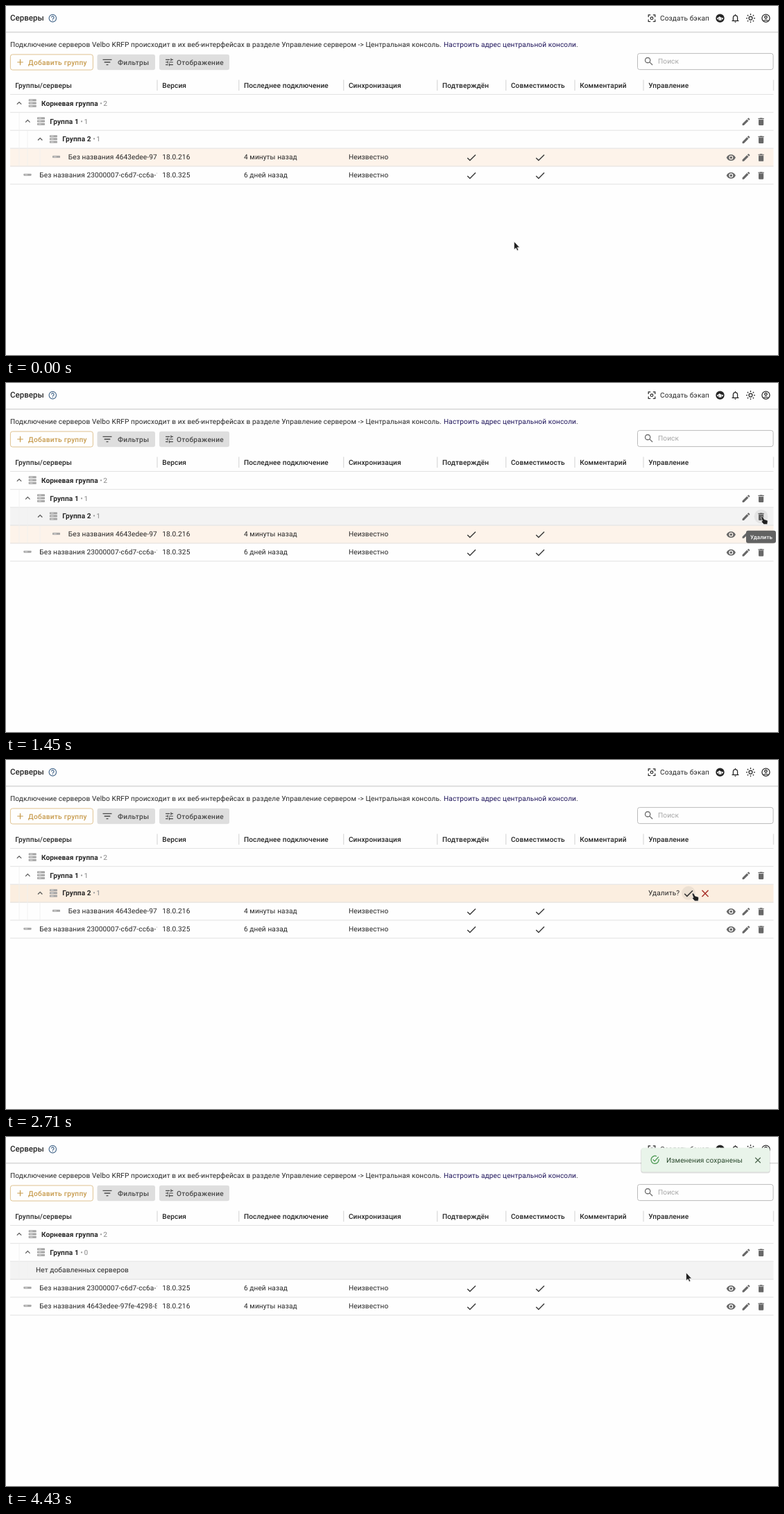
An HTML page for the animation above (4.69 s loop, 1113 by 503 pixels).

```html
<!DOCTYPE html>
<html lang="ru">
<head>
<meta charset="utf-8">
<style>
html, body { margin: 0; width: 100%; height: 100%; overflow: hidden; background: #fefefe; }
svg { display: block; width: 1113px; height: 503px; }
text { font: 400 10.11px Roboto, sans-serif; letter-spacing: .0107em; text-rendering: geometricPrecision; white-space: pre; }
.head { font-weight: 500; }
.group { font-weight: 700; }
.count { font-weight: 500; fill: #9e9e9e; }
.title { font-size: 11.55px; font-weight: 500; letter-spacing: 0; }
.button { font-weight: 500; letter-spacing: .0286em; }
.tip { font-size: 7.94px; font-weight: 500; }
</style>
</head>
<body>
<svg viewBox="0 0 1113 503">
  <clipPath id="nameCell"><rect width="217.5" height="503"/></clipPath>
  <g id="page"></g>
  <g id="live"></g>
</svg>
<script>
const LOOP = 4690, HOLD = 165;
const LEFT = 6, RIGHT = 1106.5, ROW_TOP = 127.8, ROW_H = 25.9;
const INK = '#262626', GRAY = '#686868', GOLD = '#c79a4b', LINE = '#dedede';
const TRASH_X = 1088.6, YES_X = 984, NO_X = 1008;

// Moments of the story, ms
const TIP = 1450, PRESS = 1580, ASK = 1980, CONFIRM = 3170, FOCUS = 3370, BUSY = 3570, REMOVED = 3770, TOAST = 3970;

// Pointer key points: time, x, y
const PATH = [[200, 732.5, 339.5], [800, 1097, 192], [990, 1097, 192], [1250, TRASH_X, 192.5],
  [ASK, 1087.5, 192.5], [2640, 989, 192], [BUSY - HOLD, 980.5, 195.5]];

const COLUMNS = {
  'Группы/серверы': LEFT, 'Версия': 218, 'Последнее подключение': 335.7, 'Синхронизация': 486.7,
  'Подтверждён': 621.7, 'Совместимость': 720.7, 'Комментарий': 820, 'Управление': 919
};
const COL = Object.values(COLUMNS), PAD = 7.2;

// Icons on a 24 unit grid
const ring = (x, y, r) => `M${x - r} ${y}a${r} ${r} 0 1 0 ${2 * r} 0a${r} ${r} 0 1 0 ${-2 * r} 0z`;
const rays = [...Array(8)].map((_, i) => {
  const c = Math.cos(i * Math.PI / 4), s = Math.sin(i * Math.PI / 4);
  return `M${12 + 7.5 * c} ${12 + 7.5 * s}l${3 * c} ${3 * s}`;
}).join('');
const FILLED = {
  edit: 'M3 17.2V21h3.8L17.8 9.9 14 6.2zM20.7 7a1 1 0 0 0 0-1.4L18.4 3.3a1 1 0 0 0-1.4 0L15.1 5.1l3.8 3.8z',
  trash: 'M6 7h12v12a2 2 0 0 1-2 2H8a2 2 0 0 1-2-2zM5 4h14v2H5zM9 3h6v1H9z',
  eye: 'M1 12Q4.5 4.5 12 4.5T23 12Q19.5 19.5 12 19.5T1 12z' + ring(12, 12, 5) + ring(12, 12, 3),
  face: ring(12, 12, 10) + 'M4.5 12Q9 11 10.5 8 14 11.5 19.5 11.5A8 8 0 0 1 4.5 12z' + ring(9, 14, 1.2) + ring(15, 14, 1.2)
};
const LINED = {
  check: 'M4 12.7l5 4.9L20.3 6.3',
  close: 'M5.7 5.7l12.6 12.6M18.3 5.7L5.7 18.3',
  up: 'M6.7 14.7L12 9.4l5.3 5.3',
  add: 'M12 5v14M5 12h14',
  filter: 'M3 7h18M6 12h12M10 17h4',
  tune: 'M3 6h10M16 3v6M16 6h5M3 12h5M8 9v6M11 12h10M3 18h6M12 15v6M12 18h9',
  search: ring(9.5, 9.5, 5.5) + 'M14 14l6 6',
  help: ring(12, 12, 9) + 'M9 10a3 3 0 1 1 4.5 2.6Q12 13.5 12 15M12 16v2',
  focus: ring(12, 12, 3) + 'M4 9V4h5M15 4h5v5M20 15v5h-5M9 20H4v-5',
  bell: 'M7 17v-6a5 5.5 0 0 1 10 0v6M4 18h16M12 3v2M10.5 21h3',
  sun: ring(12, 12, 4) + rays,
  user: ring(12, 12, 9) + ring(12, 9.5, 2.8) + 'M6 18.5q6-5 12 0',
  done: 'M20.5 10a9 9 0 1 1-5-6.4M7 11l4 4 9-10'
};
const ARROW = 'M0 0V11.6L2.7 9.2 4.4 13 6.3 12.2 4.6 8.4H8z';
const HAND = 'M0 1Q1.5-1 3 1L4.5 4 8.5 5.2Q10 5.8 9.6 7.5L9 11.2H4L.6 7.6Q.4 6 2 6.4z';

const text = (s, x, mid, fill = INK, cls = '') =>
  `<text x="${x}" y="${mid + 3.6}" fill="${fill}" class="${cls}">${s}</text>`;
const rect = (x, y, w, h, fill, more = '') =>
  `<rect x="${x}" y="${y}" width="${w}" height="${h}" fill="${fill}" ${more}/>`;
const frame = (x, y, w, h, color, radius = 0) =>
  rect(x, y, w, h, 'none', `rx="${radius}" stroke="${color}" stroke-width=".9"`);
const shade = (x, y, r, opacity) => `<circle cx="${x}" cy="${y}" r="${r}" opacity="${opacity}"/>`;
const icon = (name, x, y, size = .6, color = GRAY) => {
  const paint = FILLED[name] ? `fill="${color}" fill-rule="evenodd"` : `fill="none" stroke="${color}" stroke-width="2"`;
  return `<path transform="translate(${x} ${y}) scale(${size}) translate(-12 -12)" ${paint} d="${FILLED[name] || LINED[name]}"/>`;
};
const rowTop = i => ROW_TOP + ROW_H * i;
const rowMid = i => rowTop(i + .5) - .7;

function rack(x, y, bars) {
  let s = '';
  for (let i = 0; i < bars; i++) {
    const top = y + (i - (bars - 1) / 2) * 4.2;
    s += rect(x - 5.5, top - 1.5, 11, 3, '#a4a4a4', 'rx=".6"') + rect(x - 3.8, top - .4, 4, .8, '#e4e4e4');
  }
  return s;
}

function button(x, w, name, size, label, labelX, color, outline) {
  return (outline ? frame(x + .4, 69.9, w - .8, 22.2, outline, 3) : rect(x, 69.7, w, 22.6, LINE, 'rx="3"')) +
    icon(name, x + 14.5, 81, size, color) + text(label, labelX, 81, color, 'button');
}

function page() {
  return rect(0, 37, 1113, 1.2, '#d2d2d2') + rect(0, 38.2, 1113, 1, '#f0f0f0') +
    text('Серверы', LEFT, 17.7, INK, 'title') + icon('help', 67.3, 17.6, .58, '#46688c') +
    icon('focus', 931, 17.7, .6, INK) + text('Создать бэкап', 943, 17.5) +
    ['face', 'bell', 'sun', 'user'].map((name, i) => icon(name, 1029.5 + 22 * i, 17.6, .62, INK)).join('') +
    text('Подключение серверов Velbo KRFP происходит в их веб-интерфейсах в разделе Управление сервером -&gt; Центральная консоль.', LEFT, 55.3) +
    text(`Настроить адрес центральной консоли<tspan fill="${INK}">.</tspan>`, 631, 55.3, '#1c1259') +
    button(6, 119.8, 'add', .6, 'Добавить группу', 32, GOLD, '#dcbc85') +
    button(131.5, 83.5, 'filter', .72, 'Фильтры', 161, '#4a4a4a') +
    button(221, 101, 'tune', .6, 'Отображение', 246, '#4a4a4a') +
    frame(910.5, 68.4, 195.6, 23.2, '#b4b4b4', 3) +
    icon('search', 926.8, 79.8, .66, '#6e6e6e') + text('Поиск', 940, 79.8, '#a6a6a6') +
    Object.entries(COLUMNS).map(([name, x]) => text(name, x + PAD, 114.3, INK, 'head')).join('') +
    [...COL.slice(1), RIGHT].map(x => rect(x - .7, 106.5, 1.4, 15.5, LINE)).join('');
}

const tools = y => icon('edit', 1067, y + .7) + icon('trash', TRASH_X, y + .7);

function group(i, name, x, count, editable) {
  const y = rowMid(i);
  const tail = `<tspan class="count" dx="2.5">•<tspan dx="1.5">${count}</tspan></tspan>`;
  return icon('up', x, y, .6, '#555') + rack(x + 19.2, y, 3) +
    text(name + tail, x + 32, y, INK, 'group') + (editable ? tools(y) : '');
}

function server(i, x, id, version, seen) {
  const y = rowMid(i);
  return rack(x, y - .5, 1) +
    `<g clip-path="url(#nameCell)">${text('Без названия ' + id, x + 17.3, y)}</g>` +
    [version, seen, 'Неизвестно'].map((s, k) => text(s, COL[k + 1] + PAD, y)).join('') +
    [4, 5].map(k => icon('check', COL[k] + 49.3, y + .8, .72, '#3a3a3a')).join('') +
    icon('eye', 1045.3, y + .7) + tools(y);
}
const recent = (i, x) => server(i, x, '4643edee-97fe-4298-8b1c', '18.0.216', '4 минуты назад');
const older = (i, x) => server(i, x, '23000007-c6d7-cc6a-1b40', '18.0.325', '6 дней назад');

function pointerAt(t) {
  const next = PATH.findIndex(p => p[0] > t);
  if (next < 1) return PATH.at(next).slice(1);
  const [t0, ...from] = PATH[next - 1], [t1, ...to] = PATH[next];
  const k = (t - t0) / (t1 - t0), ease = k * k * (3 - 2 * k);
  return from.map((v, i) => v + (to[i] - v) * ease);
}

function toast(opacity) {
  return `<g opacity="${opacity}">` + rect(915.5, 16.5, 186, 36, '#000', 'rx="3.5" opacity=".07"') +
    rect(915.2, 16.2, 186.4, 35.2, '#000', 'rx="3.5" opacity=".1"') + rect(916, 15.6, 185, 35, '#e9f4ea', 'rx="3"') +
    icon('done', 935.8, 33, .62, '#43934a') + text('Изменения сохранены', 952, 33.2, '#2c4a2e') +
    icon('close', 1084, 33.5, .6, '#4d664f') + '</g>';
}

function live(t) {
  const during = (from, to) => t >= from && t < to;
  const [px, py] = pointerAt(Math.floor((t + 1) / HOLD) * HOLD);
  const removed = t >= REMOVED, merging = during(REMOVED, TOAST), asking = during(ASK, BUSY);
  const picked = t < ASK ? 3 : removed ? -1 : 2;
  const hover = Math.floor((py - ROW_TOP) / ROW_H), y = rowMid(2);
  const near = x => Math.abs(px - x) < 10 && Math.abs(py - y) < 8;
  const onTrash = t < ASK && near(TRASH_X), onYes = during(ASK, FOCUS) && near(YES_X);
  const onNo = asking && near(NO_X);
  let s = '';

  for (let i = 0; i < 5; i++) {
    const fill = i === picked ? (i === hover ? '#fbeee0' : '#fdf3ea') : i === hover ? '#f3f3f3' : 'none';
    s += rect(LEFT, rowTop(i), RIGHT - LEFT, ROW_H, fill);
  }
  for (let i = 0; i < 6; i++) s += rect(LEFT, rowTop(i) - .9, RIGHT - LEFT, .9, LINE);

  // Tree guides
  const depth = removed && !merging ? 3 : 4;
  [19, 31, 49].slice(0, depth - 1).forEach((x, k) => {
    s += rect(x - .4, rowTop(k + 1), .8, (depth - k - 1) * ROW_H - 1, '#f0f0f0');
  });

  s += group(0, 'Корневая группа', 19, 2) + group(1, 'Группа 1', 31.3, removed ? 0 : 1, true) +
    (removed ? text('Нет добавленных серверов', 43, y) : group(2, 'Группа 2', 49.2, 1, t < ASK));
  if (removed && !merging) s += older(3, 31) + recent(4, 31);
  else s += recent(3, 72.5) + older(4, 31) + (merging ? recent(5, 31) : '');

  if (onTrash) s += shade(TRASH_X, y + .5, 10, .06);
  if (onYes) s += shade(YES_X, y, 10, .06);
  if (during(PRESS, ASK)) s += shade(TRASH_X, y + .5, 8, .1);
  if (during(CONFIRM, FOCUS)) s += shade(YES_X, y, 8, .06);
  if (asking) s += text('Удалить?', 926, y) + icon('check', YES_X, y + .5, .72, '#303030') +
    icon('close', NO_X, y + .5, .72, onNo || during(2500, 2900) ? '#a8302a' : '#303030');
  if (during(BUSY, REMOVED)) s += rect(1019, 193.6, 3, .8, '#dcc09a');
  if (during(PRESS, ASK) || during(FOCUS, BUSY)) s += frame(919.4, 180, 186.8, 25.3, '#dcb678');
  if (during(TIP, ASK)) s += rect(1067, 212.7, 43, 18, '#626262', 'rx="3"') + text('Удалить', 1073, 220.9, '#fff', 'tip');
  if (t >= TOAST) s += toast(Math.min(1, .75 + (t - TOAST) / 1000));

  const shape = onTrash || onYes || onNo ? HAND : ARROW;
  return s + `<path transform="translate(${px} ${py})" d="${shape}" fill="#202020" stroke="#fff" stroke-width=".6"/>`;
}

document.getElementById('page').innerHTML = page();
const layer = document.getElementById('live');
function tick() {
  layer.innerHTML = live(performance.now() % LOOP);
  requestAnimationFrame(tick);
}
tick();
</script>
</body>
</html>
```
